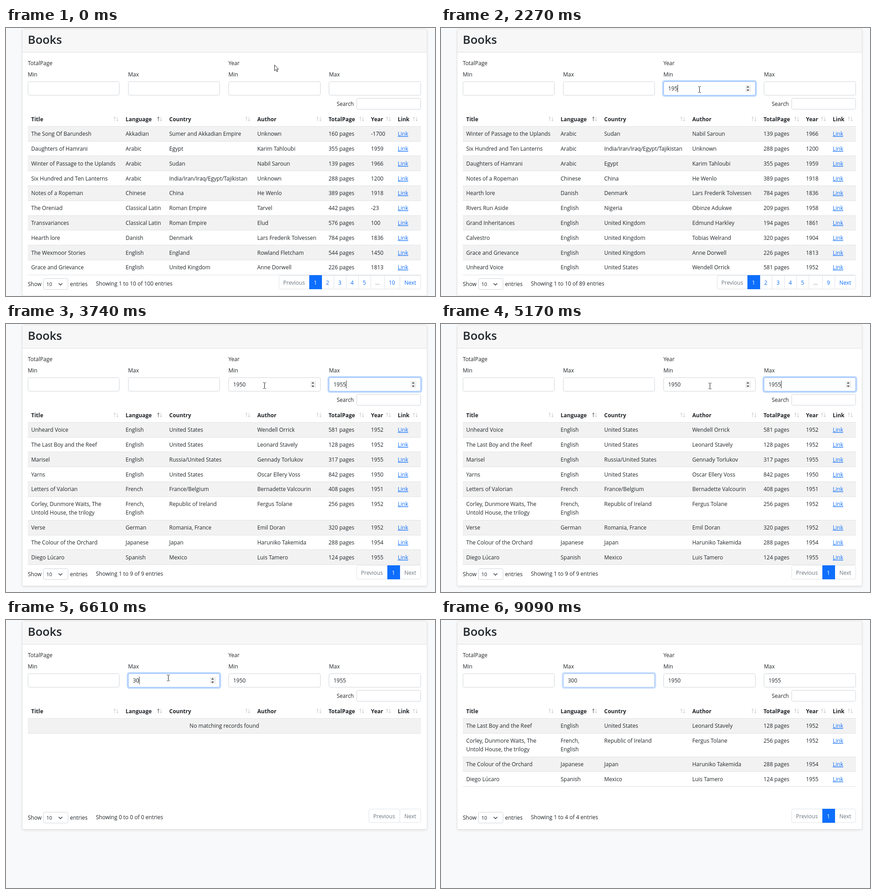
Write an HTML page that moves like this. It is 945 px wide and 592 px high and loops after 9.16 s.

```html
<!DOCTYPE html>
<html lang="en">
<head>
<meta charset="utf-8">
<title>Books</title>
<style>
  html, body { margin: 0; width: 100%; height: 100%; overflow: hidden; background: #f8f9fa; }
  svg { display: block; width: 945px; height: 592px; font: 12px "Open Sans", "Noto Sans", sans-serif; fill: #212529; }
  .card { filter: drop-shadow(0 2px 2px rgba(0, 0, 0, .08)); }
  .link { fill: #0d6efd; text-decoration: underline; }
</style>
</head>
<body>
<svg id="stage" viewBox="0 0 945 592"></svg>
<script>
const LOOP = 9160;
const stage = document.getElementById('stage');

// title | language | country | author | pages | year   (~ breaks a line)
const books = `The Song Of Barundesh|Akkadian|Sumer and Akkadian Empire|Unknown|160|-1700
Daughters of Hamrani|Arabic|Egypt|Karim Tahloubi|355|1959
Winter of Passage to the Uplands|Arabic|Sudan|Nabil Saroun|139|1966
Six Hundred and Ten Lanterns|Arabic|India/Iran/Iraq/Egypt/Tajikistan|Unknown|288|1200
Notes of a Ropeman|Chinese|China|He Wenlo|389|1918
The Oreniad|Classical Latin|Roman Empire|Tarvel|442|-23
Transvariances|Classical Latin|Roman Empire|Elud|576|100
Hearth lore|Danish|Denmark|Lars Frederik Tolvessen|784|1836
The Wexmoor Stories|English|England|Rowland Fletcham|544|1450
Grace and Grievance|English|United Kingdom|Anne Dorwell|226|1813
Rivers Run Aside|English|Nigeria|Obinze Adukwe|209|1958
Grand Inheritances|English|United Kingdom|Edmund Harkley|194|1861
Calvestro|English|United Kingdom|Tobias Welrand|320|1904
Unheard Voice|English|United States|Wendell Orrick|581|1952
Yearned|English|United States|Lena Harrowby|321|1987
Yarns|English|United States|Oscar Ellery Voss|842|1950
The Copper Almanac|English|United Kingdom|Freda Winslade|688|1962
Marisel|English|Russia/United States|Gennady Torlukov|317|1955
Daybreak's Orphans|English|United Kingdom, India|Farhan Bashrani|536|1981
The Last Boy and the Reef|English|United States|Leonard Stavely|128|1952
Letters of Valorian|French|France/Belgium|Bernadette Valcourin|408|1951
Corley, Dunmore Waits, The~Untold House, the trilogy|French,~English|Republic of Ireland|Fergus Tolane|256|1952
Verse|German|Romania, France|Emil Doran|320|1952
The Colour of the Orchard|Japanese|Japan|Haruniko Takemida|288|1954
Diego Lúcaro|Spanish|Mexico|Luis Tamero|124|1955`.split('\n').map(line => line.split('|'));

// [time, rows shown (a = first book), number of entries]
const views = [
  [0, 'abcdefghij', 100], [940, 'bcdeghijkl', 98], [2270, 'cdbehklmjn', 89], [2400, 'bcopqrnstk', 22],
  [3140, '', 0], [3670, 'ntrpuvwxy', 9], [6540, '', 0], [6810, 'tvxy', 4]
];
// [time, field, value, start of caret blinking]
const keys = [
  [0, 0, ''], [400, 2, ''], [940, 2, '1'], [1340, 2, '19'], [2270, 2, '195'], [2400, 2, '1950'],
  [2670, 3, ''], [3140, 3, '1'], [3340, 3, '19'], [3540, 3, '195'], [3670, 3, '1955'],
  [5750, 1, ''], [6540, 1, '3'], [6610, 1, '30'], [6810, 1, '300', 6740]
];
// [field, focus, blur]
const focuses = [[2, 400, 2670], [3, 2670, 5750], [1, 5750, 9050]];
// [time, x, y]
const path = [
  [0, 591, 81], [70, 591, 81], [400, 569, 136], [4200, 569, 136], [4500, 600, 148], [4830, 620, 138],
  [5030, 620, 138], [5720, 357, 128], [7470, 357, 128], [7540, 352, 129], [7800, 352, 129],
  [8020, 805, 558], [8220, 805, 558], [8400, 880, 604], [LOOP, 880, 604]
];
const fields = [0, 1, 2, 3].map(i => {
  const x = 48 + 221.1 * i;
  return { left: Math.round(x), right: Math.round(x + 202.3) };
});
const columns = [
  ['Title', 55.5, 242], ['Language', 263.5, 338], ['Country', 359.5, 532], ['Author', 553.5, 689],
  ['TotalPage', 710.5, 783], ['Year', 804, 842], ['Link', 863, 901]
];

const last = (list, t) => list.filter(item => item[0] <= t).pop();
const smooth = p => { p = Math.min(1, Math.max(0, p)); return p * p * (3 - 2 * p); };
const text = (x, y, s, attrs = '') => `<text x="${x}" y="${y}" ${attrs}>${s}</text>`;
const rect = (x, y, w, h, fill, attrs = '') =>
  `<rect x="${x}" y="${y}" width="${w}" height="${h}" fill="${fill}" ${attrs}/>`;
const box = (x, y, w, h, stroke = '#ced4da', fill = '#fff', r = 3) =>
  rect(x + .5, y + .5, w - 1, h - 1, fill, `stroke="${stroke}" rx="${r}"`);
const shape = (d, attrs) => `<path d="${d}" ${attrs}/>`;

function cursorAt(t) {
  const i = path.findIndex(p => p[0] > t);
  const [t0, x0, y0] = path[i - 1], [t1, x1, y1] = path[i];
  const p = smooth((t - t0) / (t1 - t0));
  return [x0 + (x1 - x0) * p, y0 + (y1 - y0) * p];
}

const hoveredField = (x, y) =>
  y >= 118 && y <= 147 ? fields.findIndex(f => x >= f.left && x <= f.right) : -1;

function drawField(i, t, hovered) {
  const { left, right } = fields[i], w = right - left;
  const focus = focuses.find(f => f[0] === i);
  const glow = focus ? smooth((t - focus[1]) / 150) - smooth((t - focus[2]) / 150) : 0;
  const focused = focus && t >= focus[1] && t < focus[2];
  const key = last(keys.filter(k => k[1] === i), t);
  const value = key ? key[2] : '';
  let out = '';
  if (glow > 0) out += rect(left - 3, 115, w + 6, 37, '#0d6efd', `rx="6" opacity="${.25 * glow}"`);
  out += box(left, 118, w, 31);
  if (glow > 0) out += `<g opacity="${glow}">${box(left, 118, w, 31, '#86b7fe')}</g>`;
  out += text(left + 10.5, 138, value);
  if (focused || hovered)
    out += rect(left + 180, 126, 13, 15, '#efefef') +
      shape(`M${left + 183} 131.5h6l-3-3.5zM${left + 183} 136h6l-3 3.5z`, 'fill="#505050"');
  if (focused && (t - (key[3] || key[0])) % 1060 < 530)
    out += rect(Math.round(left + 10.5 + value.length * 6.86), 125, 1, 17, '#212529');
  return out;
}

function drawTable(rows) {
  let y = 217.22, out = rect(48, 217, 866, 1, '#dee2e6');
  columns.forEach(([name, x, ax], i) => {
    const arrow = (cx, dir, color) =>
      shape(`M${cx} 196.5v9M${cx - 2} ${201 - dir * 2}L${cx} ${201 - dir * 4.5}L${cx + 2} ${201 - dir * 2}`,
        `fill="none" stroke="${color}"`);
    out += text(x, 206, name, 'font-weight="700"') +
      arrow(ax - 2.5, 1, i === 1 ? '#555' : '#c8c9ca') + arrow(ax + 3.5, -1, '#c8c9ca');
  });
  const addRow = (i, height, content) => {
    const top = Math.floor(y), bottom = Math.floor(y + height);
    if (i % 2 === 0) out += rect(48, top + 1, 866, bottom - top - 1, '#f2f2f2');
    out += rect(48, bottom, 866, 1, '#dee2e6') + content(Math.round(y) + 21);
    y += height;
  };
  [...rows].forEach((letter, i) => {
    const [title, language, country, author, pages, year] = books[letter.charCodeAt(0) - 97];
    const cells = [title, language, country, author, pages + ' pages', year, 'Link'];
    addRow(i, title.includes('~') ? 52 : 32.8, base => cells.map((cell, c) =>
      cell.split('~').map((line, n) =>
        text(columns[c][1], base + n * 19, line, c === 6 ? 'class="link"' : '')).join('')).join(''));
  });
  if (!rows) addRow(0, 32.8, base => text(481, base, 'No matching records found', 'text-anchor="middle"'));
  return [out, y];
}

function drawPager(top, total) {
  const count = Math.ceil(total / 10);
  const pages = count > 7 ? [1, 2, 3, 4, 5, '...', count] : Array.from({ length: count }, (_, i) => i + 1);
  const widths = { Previous: 67.5, Next: 47.4, '...': 29.2 };
  let right = 914, out = '', active = '';
  for (const page of ['Previous', ...pages, 'Next'].reverse()) {
    const w = widths[page] || 20.2 + 6.86 * String(page).length;
    const left = Math.round(right - w), edge = Math.round(right);
    const off = page === 'Previous' || page === '...' || (page === 'Next' && count < 2);
    const color = page === 1 ? '#fff' : off ? '#6c757d' : '#0d6efd';
    const label = text((left + edge) / 2, top + 20, page, `text-anchor="middle" fill="${color}"`);
    const end = page === 'Previous' || page === 'Next';
    if (page === 1) active = box(left, top - 1, edge - left + 1, 31, '#0d6efd', '#0d6efd', 0) + label;
    else out += box(left, top - 1, edge - left + (page === 'Next' ? 0 : 1), 31, '#dee2e6', '#fff', end ? 3 : 0) + label;
    right -= w;
  }
  return out + active;
}

function drawCursor(x, y, overField) {
  if (overField) {
    const cx = Math.round(x) + .5, cy = Math.round(y);
    return shape(`M${cx - 3} ${cy - 6.5}h2l1 1l1-1h2M${cx} ${cy - 5.5}v11M${cx - 3} ${cy + 6.5}h2l1-1l1 1h2`,
      'fill="none" stroke="#111"');
  }
  return shape('M.5 .5V13.5L3.5 10.8L5.7 15.7L7.7 14.8L5.5 10H9.3Z',
    `transform="translate(${Math.round(x)} ${Math.round(y)})" fill="#fff" stroke="#222"`);
}

function render(t) {
  const [, rows, total] = last(views, t);
  const [x, y] = cursorAt(t);
  const hovered = hoveredField(x, y);
  const [table, tableEnd] = drawTable(rows);
  const top = Math.max(Math.round(tableEnd + 2), 418);
  const labels = [[48, 82, 'TotalPage'], [490, 82, 'Year'], [48, 107, 'Min'], [269, 107, 'Max'],
    [490, 107, 'Min'], [711.5, 107, 'Max'], [728.5, 172, 'Search'],
    [48, top + 23, 'Show'], [141, top + 23, 'entries'],
    [198, top + 22, `Showing ${total ? 1 : 0} to ${rows.length} of ${total} entries`]];
  return `<g class="card">${box(35, 2, 893, top + 43, '#dfdfdf')}</g>` +
    rect(36, 3, 891, 51, '#f7f7f7', 'rx="2"') + rect(36, 53, 891, 1, '#dfdfdf') +
    text(48, 35, 'Books', 'font-size="25.6" font-weight="600"') +
    labels.map(label => text(...label)).join('') +
    fields.map((_, i) => drawField(i, t, hovered === i)).join('') +
    box(772, 155, 142, 25) + table +
    box(82, top + 6, 55, 25) + text(89, top + 23, '10', 'font-size="11"') +
    shape(`M116 ${top + 17}l4 4l4-4`, 'fill="none" stroke="#343a40" stroke-width="1.5"') +
    drawPager(top, total) + drawCursor(x, y, hovered >= 0);
}

let shown = '';
function frame() {
  const markup = render(performance.now() % LOOP);
  if (markup !== shown) stage.innerHTML = shown = markup;
  requestAnimationFrame(frame);
}
frame();
</script>
</body>
</html>
```
